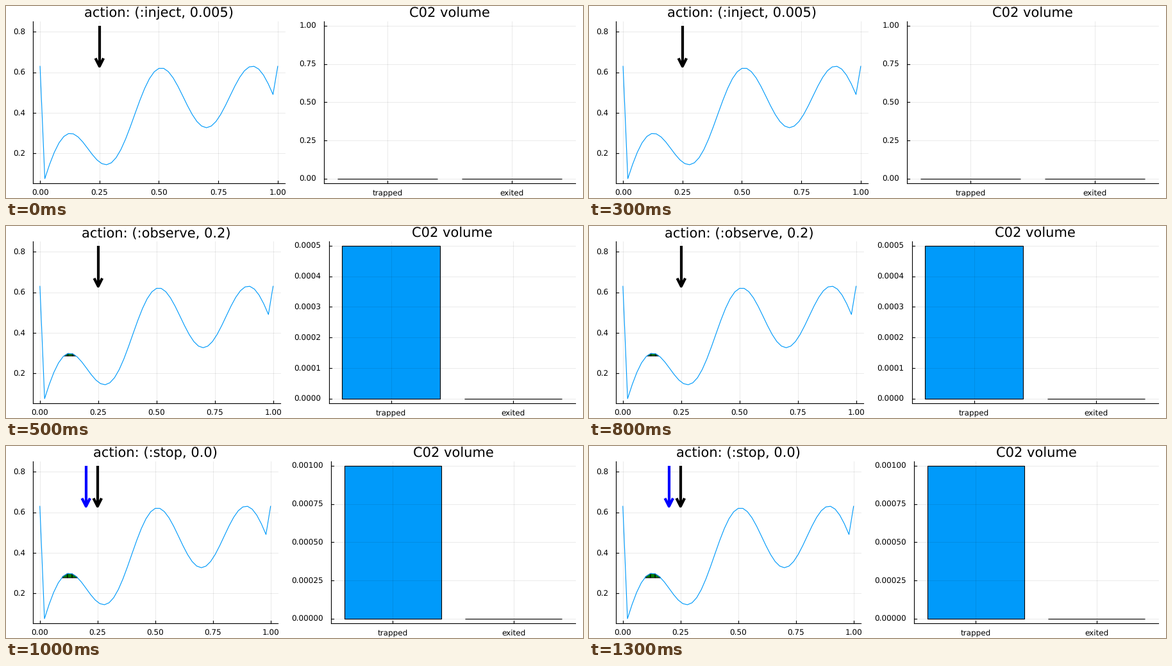
Write a matplotlib script that moves like this. It is 900 by 300 pixels and loops after 1500 ms.

```python
import matplotlib.pyplot as plt
import numpy as np
from matplotlib.animation import FuncAnimation

plt.rcParams["font.family"] = "DejaVu Sans"
plt.rcParams["text.hinting"] = "none"

W, H, DPI = 900, 300, 100
PX = 72 / DPI  # points per pixel
TOP, BOTTOM = 23.6, 277
LEFT, RIGHT = 42, 888
PAD = 0.03 / 1.06
BLUE = "#009AFA"
THIN = 1.15

# title, right end of left panel, left end of right panel,
# bar tick labels, filled share of the first bar, gas level, arrows
STEPS = [
    ("action: (:inject, 0.005)", 435, 496,
     [f"{v:.2f}" for v in np.linspace(0, 1, 5)], 0, None,
     [(0.25, "black")]),
    ("action: (:observe, 0.2)", 427.5, 503.5,
     [f"{v:.4f}" for v in np.linspace(0, 0.0005, 6)], 1, 0.2862,
     [(0.25, "black")]),
    ("action: (:stop, 0.0)", 423.5, 507.2,
     [f"{v:.5f}" for v in np.linspace(0, 0.001, 5)], 1, 0.2772,
     [(0.25, "black"), (0.2, "blue")]),
]

xs = np.linspace(0, 1, 51)
hs = 0.1672 * np.sin(5 * np.pi * xs) + 0.236 * np.sin(np.pi * xs) + 0.433 * xs
hs[[0, -1]] = 0.63

fig = plt.figure(figsize=(W / DPI, H / DPI), dpi=DPI, facecolor="white")
ax = fig.add_axes([0, 0, 1, 1])


def line(x, y, color="black", width=THIN, **kw):
    ax.plot(x, y, color=color, lw=width * PX, **kw)


def text(x, y, s, size=12, ha="center"):
    ax.text(x, y, s, fontsize=size * PX, ha=ha, va="baseline")


def panel(x0, x1, title, xticks, yticks):
    """Grid, two axis lines, inward ticks and labels; ticks are (pixel, label)."""
    for x, _ in xticks:
        line([x, x], [BOTTOM, TOP], width=0.8, alpha=0.1)
    for y, _ in yticks:
        line([x0, x1], [y, y], width=0.8, alpha=0.1)
    line([x0, x0], [TOP, BOTTOM])
    line([x0, x1], [BOTTOM, BOTTOM])
    for x, label in xticks:
        line([x, x], [BOTTOM, BOTTOM - 4])
        text(x, 295.4, label)
    for y, label in yticks:
        line([x0, x0 + 4], [y, y])
        text(x0 - 12, y + 4.4, label, ha="right")
    text((x0 + x1) / 2, 18, title, size=21)


def height_px(v):
    return BOTTOM - (v - 0.0524) * 316.5


def gas(to_x, level):
    """Cells between the curve and the level, cut where they cross."""
    for a, b, ha, hb in zip(xs[1:24], xs[2:25], hs[1:24], hs[2:25]):
        if max(ha, hb) <= level or a > 0.2:
            continue
        cut = a + (b - a) * (level - ha) / (hb - ha)
        if ha < level:
            a, ha = cut, level
        if hb < level:
            b, hb = cut, level
        px = to_x(np.array([a, a, b, b]))
        py = height_px(np.array([level, ha, hb, level]))
        ax.fill(px, py, fc="green", ec="black", lw=THIN * PX)


def arrow(x, color):
    tip = height_px(0.63)
    line([x, x], [height_px(0.83), tip], color, 4.2, solid_capstyle="butt")
    line([x - 6.3, x, x + 6.3], [tip - 12.5, tip, tip - 12.5], color, 4.2,
         solid_capstyle="butt", solid_joinstyle="round")


def curve_panel(x1, title, level, arrows):
    span = x1 - LEFT

    def to_x(v):
        return LEFT + span * (PAD + v / 1.06)

    panel(LEFT, x1, title,
          [(to_x(v), f"{v:.2f}") for v in np.linspace(0, 1, 5)],
          [(height_px(v), f"{v:.1f}") for v in (0.2, 0.4, 0.6, 0.8)])
    line(to_x(xs), height_px(hs), BLUE)
    if level:
        gas(to_x, level)
    for v, color in arrows:
        arrow(to_x(v), color)


def bar_panel(x0, labels, share):
    span = RIGHT - x0
    base, full = BOTTOM - 7.2, TOP + 7.2
    centers = [x0 + span * f for f in (0.2525, 0.7475)]
    rows = np.linspace(base, full, len(labels))
    panel(x0, RIGHT, "C02 volume",
          list(zip(centers, ("trapped", "exited"))), list(zip(rows, labels)))
    half = 0.198 * span
    for c, part in zip(centers, (share, 0)):
        top = base + (full - base) * part
        ax.fill([c - half, c + half, c + half, c - half],
                [base, base, top, top], fc=BLUE, ec="black", lw=THIN * PX)


def draw(i):
    title, x1, x0, labels, share, level, arrows = STEPS[i % len(STEPS)]
    ax.clear()
    ax.set_xlim(0, W)
    ax.set_ylim(H, 0)
    ax.axis("off")
    curve_panel(x1, title, level, arrows)
    bar_panel(x0, labels, share)
    return []


anim = FuncAnimation(fig, draw, frames=len(STEPS), interval=500,
                     repeat=True, repeat_delay=0)
plt.show()
```
